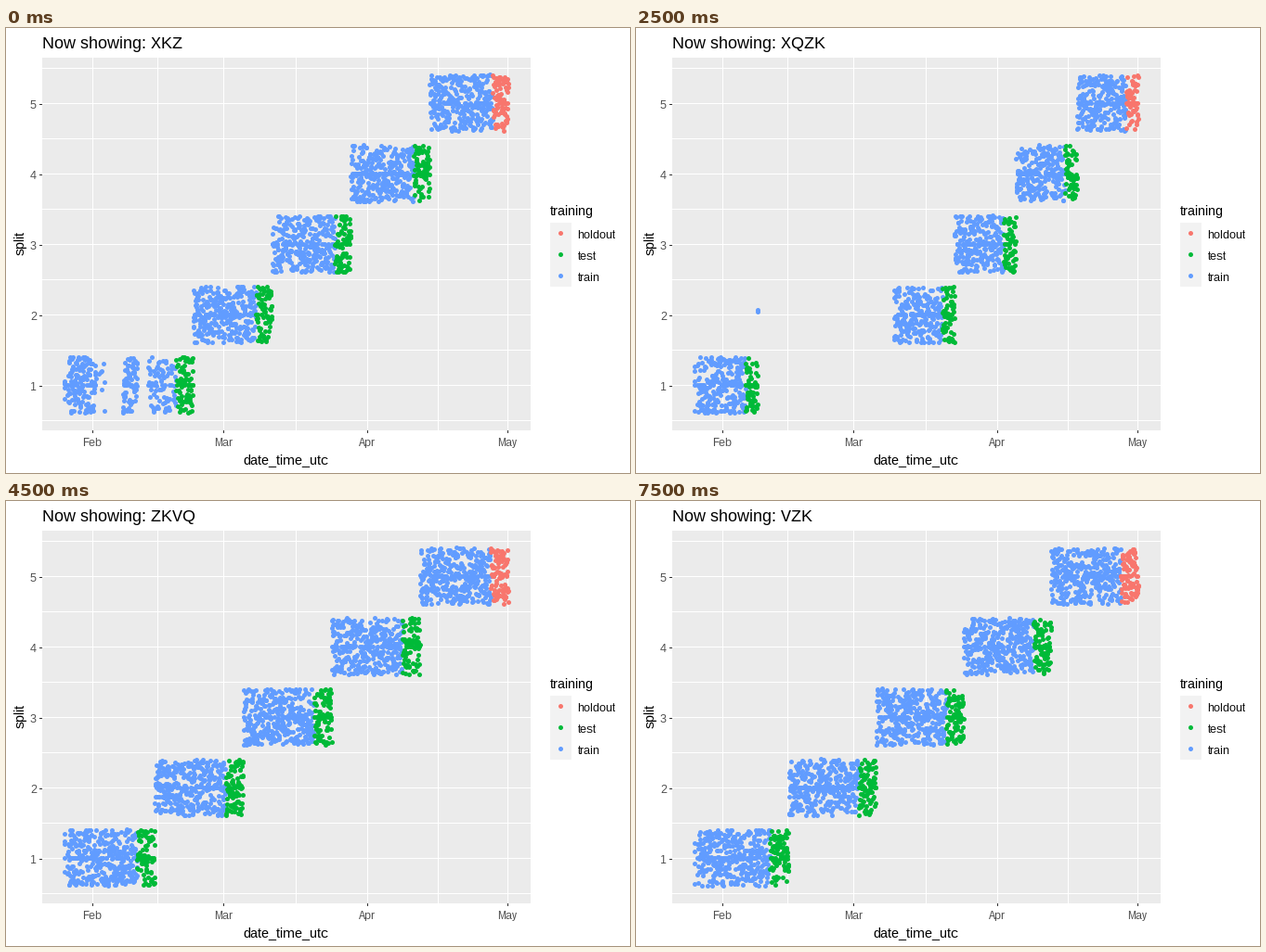
Animation, 672 px wide and 480 px high, one loop 8000 ms. Source, as a matplotlib script:

```python
import matplotlib as mpl
import matplotlib.pyplot as plt
import numpy as np
from matplotlib.animation import FuncAnimation
from matplotlib.colors import to_rgba_array
from matplotlib.patches import Rectangle

mpl.rcParams.update({
    "font.family": "Liberation Sans",
    "text.hinting": "native",
    "text.hinting_factor": 1,
})

W, H, DPI = 672, 480, 96
STEP_MS, STEPS = 500, 16
LEFT, TOP, RIGHT, BOTTOM = 39, 32, 565, 434
FIRST, LAST = 63, 541.5   # x of the first and last hour
DAY = 5.02                # px per day

RED, GREEN, BLUE = "#F8766D", "#00BA38", "#619CFF"
LABELS = ["XKZ", "ZVX", "XQZK", "VQK", "ZKVQ", "KXZQ", "QZX", "VZK"]

# per state: (from, to, share of hours that have data)
OUTAGES = {
    0: [(97, 107, 0.2), (107, 126, 0), (142, 153, 0), (153, 187, 0.6)],
    3: [(132, 278, 0)],
    4: [(172, 183, 0), (262, 330, 0.6)],
    8: [(FIRST, 165, 0.93)],
}

fig = plt.figure(figsize=(W / DPI, H / DPI), dpi=DPI, facecolor="white")
ax = fig.add_axes([0, 0, 1, 1])
ax.set_xlim(0, W)
ax.set_ylim(H, 0)
ax.axis("off")


def day_x(day):
    return 93.65 + DAY * day


def split_y(k):
    return 233.3 - 76.05 * (k - 3)


def box(x, y, w, h, color):
    ax.add_patch(Rectangle((x, y), w, h, fc=color, lw=0, antialiased=False))


def text(x, y, s, px, color="black", ha="left", **kw):
    return ax.text(x, y, s, fontsize=px * 72 / DPI, color=color, ha=ha,
                   va="baseline", **kw)


def pixel_centers(xs, ys):
    return np.floor(np.column_stack([xs, ys])) + 0.5


def dots(xy, colors):
    return ax.scatter(*xy.T, s=(5 * 72 / DPI) ** 2, c=colors, linewidths=0,
                      zorder=3)


def draw_panel():
    wide, high = RIGHT - LEFT, BOTTOM - TOP
    box(LEFT, TOP, wide, high, "#EBEBEB")
    for k in np.arange(0.5, 6, 0.5):
        box(LEFT, int(split_y(k)), wide, 1, "white")
    months = np.cumsum([0, 28, 31, 30])
    for day in (months[1:] + months[:-1]) / 2:
        box(int(day_x(day)), TOP, 1, high, "white")
    for day, month in zip(months, ("Feb", "Mar", "Apr", "May")):
        x = int(day_x(day))
        box(x, TOP, 1, high, "white")
        box(x, BOTTOM, 1, 3, "#333333")
        text(x, 451, month, 12, "#4D4D4D", "center")
    for k in range(1, 6):
        y = int(split_y(k)) + 1
        box(LEFT - 3, y, 3, 1, "#333333")
        text(33, y + 5, str(k), 12, "#4D4D4D", "right")
    text(301, 470, "date_time_utc", 15, ha="center")
    text(20, 232, "split", 15, ha="center", rotation=90,
         rotation_mode="anchor")


def draw_legend():
    text(586, 202, "training", 15)
    box(586, 210, 23, 69, "#F2F2F2")
    ys = 221 + 23 * np.arange(3)
    dots(pixel_centers(np.full(3, 597), ys), [RED, GREEN, BLUE])
    for y, name in zip(ys, ("holdout", "test", "train")):
        text(615.5, y + 6, name, 12)


def make_state(i):
    """Hourly points cut into five equal runs, each 80% train, 20% test."""
    rng = np.random.default_rng(i)
    xs = np.arange(FIRST, LAST, DAY / 24)
    for lo, hi, share in [(64, 66.5, 0)] + OUTAGES.get(i, []):
        inside = (xs >= lo) & (xs < hi)
        xs = xs[~inside | (rng.random(len(xs)) < share)]
    ys, colors = [], []
    for k, run in enumerate(np.array_split(xs, 5), 1):
        n = len(run)
        jitter = rng.uniform(-0.4, 0.4, n)
        jitter[rng.random(n) < 0.08] = 0
        ys.append(split_y(k + jitter))
        train = int(0.8 * n)
        colors += [BLUE] * train + [RED if k == 5 else GREEN] * (n - train)
    return pixel_centers(xs, np.concatenate(ys)), to_rgba_array(colors)


STATES = [make_state(i) for i in range(STEPS // 2 + 1)]

draw_panel()
draw_legend()
title = text(39, 22, "", 18)
cloud = dots(*STATES[0])


def update(i):
    # the points switch one step ahead of the title
    xy, colors = STATES[(i + 1) // 2]
    cloud.set_offsets(xy)
    cloud.set_facecolors(colors)
    title.set_text("Now showing: " + LABELS[i // 2])
    return cloud, title


anim = FuncAnimation(fig, update, frames=STEPS, interval=STEP_MS,
                     repeat=True, repeat_delay=0, blit=False)
plt.show()
```
